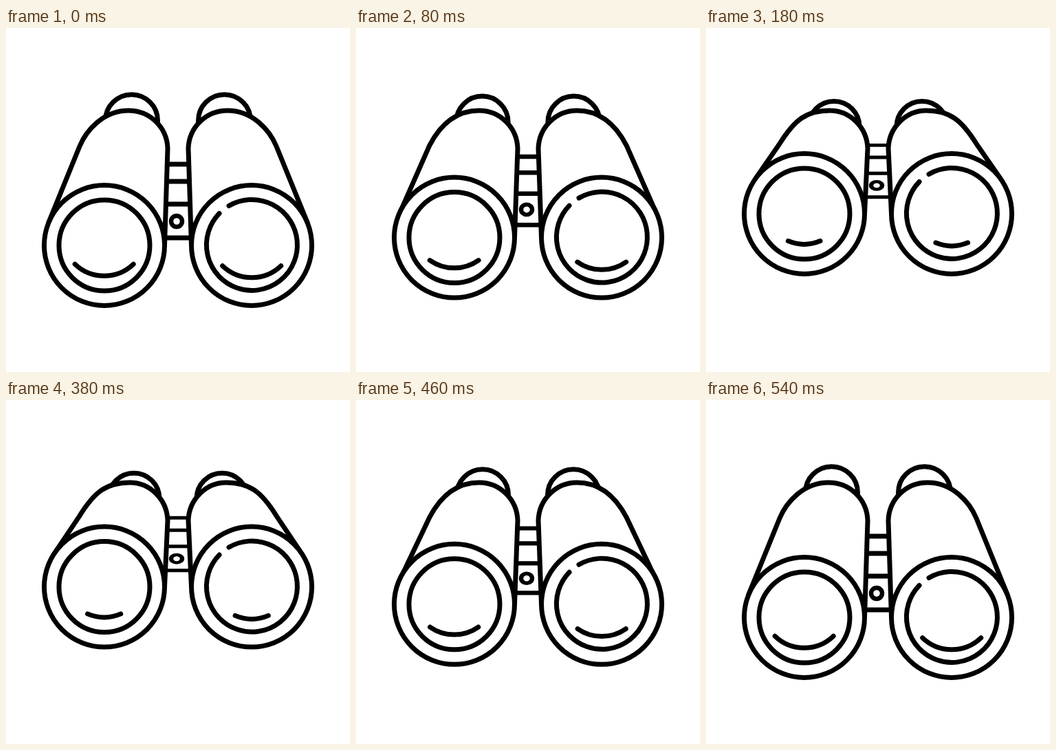
An HTML page that plays this animation: 500x500 px, repeating every 0.68 s.

```html
<!DOCTYPE html>
<html lang="en">
<head>
<meta charset="utf-8">
<title>Binoculars</title>
<style>
  html, body { margin: 0; width: 100%; height: 100%; overflow: hidden; background: #fff; }
  svg { display: block; width: 100vw; height: 100vh; }
  .ink { fill: #fff; stroke: #000; stroke-width: 7; stroke-linecap: round; stroke-linejoin: round; }
  .line { fill: none; }
</style>
</head>
<body>
<svg viewBox="0 0 500 500">
  <g class="ink">
    <g id="hinge">
      <path class="line" stroke-linecap="butt" d="M233 0H268M233 25H268M233 58H268M231 107H270"/>
      <circle cx="248" cy="83" r="8" stroke-width="6.4"/>
    </g>
    <g id="tube">
      <circle id="eyepiece"/>
      <path id="barrel"/>
    </g>
    <use href="#tube" transform="matrix(-1 0 0 1 500 0)"/>
    <g id="lenses">
      <circle cx="143" r="87.5"/>
      <circle cx="143" r="66"/>
      <circle cx="357" r="87.5"/>
      <path class="line" d="M324 -57.5A66 66 0 1 1 310 -46.5"/>
      <path id="glintL" class="line"/>
      <path id="glintR" class="line"/>
    </g>
  </g>
</svg>
<script>
const LOOP = 680, STEP = 20, STEPS = 9, BACK = 360;
const $ = id => document.getElementById(id);
const mix = (a, b, t) => a + (b - a) * t;
const set = (id, attrs) => {
  for (const k in attrs) $(id).setAttribute(k, attrs[k]);
};

// Smooth ease over the nine steps, starting after `delay` steps.
function ease(step, delay) {
  const x = Math.min(1, Math.max(0, (step - delay) / (STEPS - delay)));
  return x * x * (3 - 2 * x);
}

function glint(cx, cy, degrees) {
  const r = 61.5, a = degrees * Math.PI / 180;
  const dx = r * Math.sin(a), y = cy + r * Math.cos(a);
  return `M${cx - dx} ${y}A${r} ${r} 0 0 0 ${cx + dx} ${y}`;
}

// lead: the barrels and the glints; tilt: the lenses, which set off later.
function draw(lead, tilt) {
  const L = (a, b) => mix(a, b, lead);
  const T = (a, b) => mix(a, b, tilt);
  const cy = T(316, 270);

  set('lenses', { transform: `translate(0 ${cy})` });
  set('hinge', { transform: `translate(0 ${L(198, 170.4)}) scale(1 ${T(1, 0.705)})` });
  set('eyepiece', { cx: T(182.5, 186), cy: T(134.7, 143.5), r: T(38, 37) });

  const crest = L(178, 180);
  set('barrel', {
    d: `M${T(62, 72.6)} ${cy - T(33.4, 52)}L${L(107, 106.5)} ${L(172, 169)}` +
       `C${L(117, 129)} ${L(148, 133)} ${L(142, 146)} 120 ${crest} 120` +
       `C210 120 234 145 235 175L230.5 ${cy}`
  });

  const spread = L(43.7, 22.3);
  set('glintL', { d: glint(142.7, -17.3, spread) });
  set('glintR', { d: glint(357.2, -14.8, spread) });
}

function tick(now) {
  const t = now % LOOP;
  if (t < BACK) {
    const step = Math.floor(t / STEP);
    draw(ease(step, 0.2), ease(step, 1.6));
  } else {
    const p = 1 - ease(Math.floor((t - BACK) / STEP), 0);
    draw(p, p);
  }
}

const start = performance.now();
function frame() {
  tick(performance.now() - start);
  requestAnimationFrame(frame);
}
frame();
</script>
</body>
</html>
```
